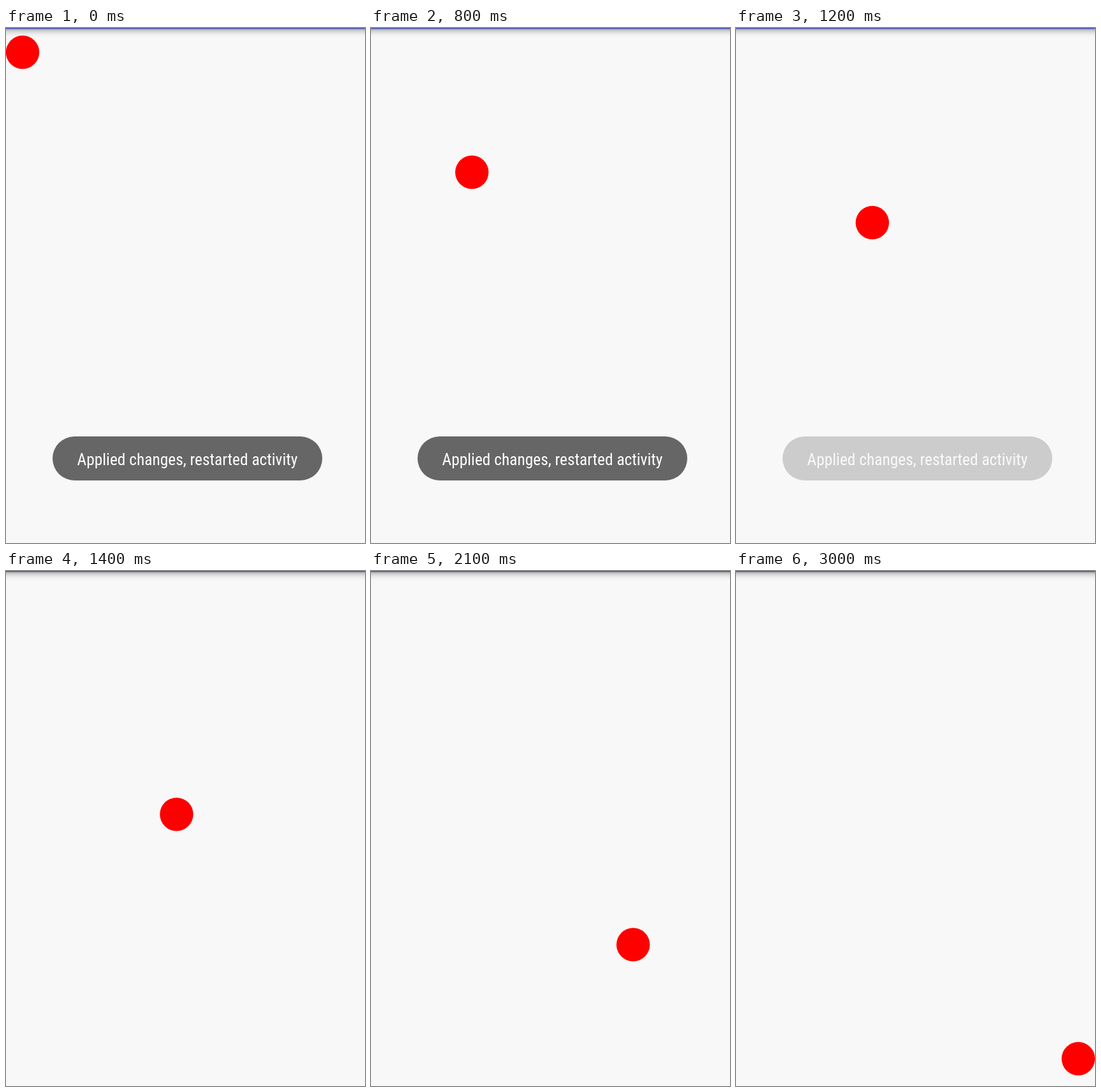
Write an HTML page that moves like this. It is 563 px wide and 807 px high and loops after 3100 ms.

```html
<!DOCTYPE html>
<html lang="en">
<head>
<meta charset="utf-8">
<title>Moving ball</title>
<style>
  html, body { margin: 0; width: 100%; height: 100%; overflow: hidden; background: #f8f8f8; }
  svg { display: block; }
  text {
    font: 26px "Roboto Condensed", Roboto, sans-serif;
    font-stretch: condensed;
    text-anchor: middle;
    fill: #fff;
  }
</style>
</head>
<body>
<svg width="563" height="807" viewBox="0 0 563 807">
  <defs>
    <linearGradient id="shade" x2="0" y2="1">
      <stop offset="0" stop-opacity=".33"/>
      <stop offset=".3" stop-opacity=".14"/>
      <stop offset=".65" stop-opacity=".04"/>
      <stop offset="1" stop-opacity="0"/>
    </linearGradient>
  </defs>
  <rect width="563" height="807" fill="#f8f8f8"/>
  <rect y="1" width="563" height="14" fill="url(#shade)"/>
  <rect width="563" height="1.4" fill="#3f51b5"/>
  <g id="toast">
    <rect x="73" y="640" width="423" height="69" rx="34.5" fill="#666"/>
    <text id="label" x="284.5" y="684.5">Applied changes, restarted activity</text>
  </g>
  <circle id="ball" r="26.2" fill="#f00"/>
</svg>
<script>
const LOOP = 3100, STEP = 100;
const [toast, label, ball] = ['toast', 'label', 'ball'].map(id => document.getElementById(id));

// [step, value] pairs, linear in between
const height = [[0, 38], [1, 52], [6, 149], [8, 226], [12, 305], [13, 348], [16, 448],
  [18, 489], [21, 585.5], [24, 650.5], [26, 697.5], [30, 764.2]];
const opacity = [[0, 1], [10, 1], [11, 0.8], [12, 0.295], [13, 0], [30, 0]];

function valueAt(keys, step) {
  const i = Math.max(1, keys.findIndex(key => key[0] >= step));
  const [s0, v0] = keys[i - 1], [s1, v1] = keys[i];
  return v0 + (v1 - v0) * (step - s0) / (s1 - s0);
}

// Smaller type when only a wider face is available
const width = label.getComputedTextLength();
if (width > 352) label.style.fontSize = 26 * 346 / width + 'px';

function draw() {
  const step = Math.floor(performance.now() % LOOP / STEP);
  const y = valueAt(height, step);
  ball.setAttribute('cx', 26 + (y - 38) * 510.8 / 726.2);
  ball.setAttribute('cy', y);
  toast.setAttribute('opacity', valueAt(opacity, step));
  requestAnimationFrame(draw);
}
draw();
</script>
</body>
</html>
```
